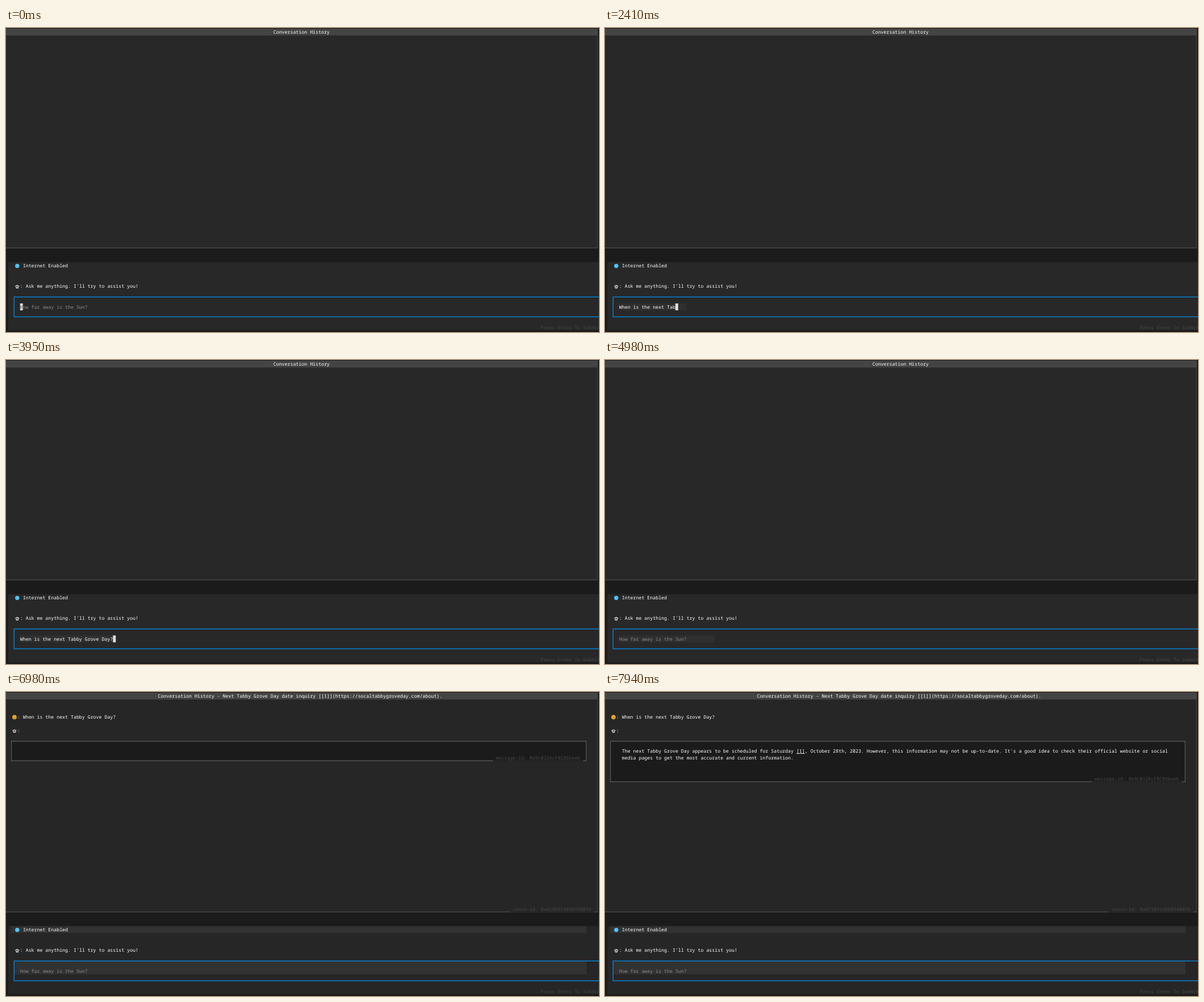
Recreate the animation shown at these times as an HTML page with a canvas. Size 1044 px wide and 536 px high, loop 8000 ms.

```html
<!DOCTYPE html>
<html lang="en">
<head>
<meta charset="utf-8">
<title>Terminal chat</title>
<style>
html, body { margin: 0; width: 100%; height: 100%; overflow: hidden; background: #1b1b1b; }
canvas { display: block; width: 1044px; height: 536px; }
</style>
</head>
<body>
<canvas id="stage" width="1044" height="536"></canvas>
<script>
const ctx = document.getElementById('stage').getContext('2d');
const LOOP = 8000;
const CELL_W = 4.955, CELL_H = 12.116;
const FONT = '8.26px "Noto Sans Mono", "DejaVu Sans Mono", monospace';

const EVENT = 'Tabby Grove Day';
const QUESTION = `When is the next ${EVENT}?`;
const HINT = 'How far away is the Sun?';
const SITE = 'https://socaltabbygroveday.com/about';
const LEAD = `The next ${EVENT} appears to be scheduled for Saturday `;
const ANSWER = [
  LEAD + "[1], October 28th, 2023. However, this information may not be up-to-date. It's a good idea to check their official website or social",
  'media pages to get the most accurate and current information.'
];

// Typing bursts: start, end, first and last character count.
const BURSTS = [
  [330, 330, 1, 1], [480, 750, 2, 5], [900, 1020, 6, 8], [1170, 1170, 10, 10],
  [1540, 1540, 11, 11], [1600, 1870, 12, 15], [2050, 2050, 17, 17],
  [2230, 2410, 18, 20], [2560, 2710, 21, 23], [2920, 3520, 24, 31],
  [3670, 3670, 32, 32], [3950, 3950, 33, 33]
];
const SUBMIT = 4230, REPLY = 5440, TITLED = 5500, STREAM = 7380;
const BLINKS = [150, 330, 4980, 5440, 5960, 6450, 6980, 7490, 7940];

const colX = col => col * CELL_W;
const rowY = row => 1 + row * CELL_H;

function fill(color, x0, y0, x1, y1) {
  ctx.fillStyle = color;
  ctx.fillRect(x0, y0, x1 - x0, y1 - y0);
}

function text(str, col, row, color = '#ffffff') {
  const baseline = Math.round(rowY(row) + 9.2);
  ctx.fillStyle = color;
  [...str].forEach((ch, i) => {
    if (ch !== ' ') ctx.fillText(ch, colX(col + i), baseline);
  });
}

function underline(col, row, count) {
  const y = Math.round(rowY(row) + 10.2);
  fill('#d8d8d8', colX(col), y, colX(col + count), y + 1);
}

function disc(color, x, y, r) {
  ctx.fillStyle = color;
  ctx.beginPath();
  ctx.arc(x, y, r, 0, Math.PI * 2);
  ctx.fill();
}

function robot(x, y, lamp) {
  fill('#b9c3c6', x - 3.4, y - 2, x + 3.4, y - 0.5);
  ctx.fillStyle = '#c9d0d2';
  ctx.beginPath();
  ctx.roundRect(x - 2.6, y - 2.5, 5.2, 5.6, [1, 1, 2.5, 2.5]);
  ctx.fill();
  fill('#3b4447', x - 1.8, y - 1.2, x + 1.8, y + 0.4);
  fill('#59666a', x - 1, y + 1.2, x + 1, y + 1.9);
  disc(lamp, x, y - 2.7, 0.8);
}

function smiley(x, y) {
  disc('#f4b52e', x, y, 3.8);
  disc('#5c3c12', x - 1.3, y - 0.9, 0.6);
  disc('#5c3c12', x + 1.3, y - 0.9, 0.6);
  ctx.strokeStyle = '#5c3c12';
  ctx.lineWidth = 0.7;
  ctx.beginPath();
  ctx.arc(x, y + 0.3, 1.9, 0.3, Math.PI - 0.3);
  ctx.stroke();
}

function typedCount(t) {
  let count = 0;
  if (t >= SUBMIT) return count;
  for (const [start, end, first, last] of BURSTS) {
    if (t < start) break;
    const p = end > start ? Math.min(1, (t - start) / (end - start)) : 1;
    count = first + Math.floor(p * (last - first) + 1e-6);
  }
  return count;
}

const cursorOn = t => BLINKS.filter(b => t >= b).length % 2 === 0;

function answerLines(t) {
  if (t < STREAM) return [];
  if (t < 7440) return [LEAD + '[[1]](' + SITE.slice(0, 12)];
  if (t < 7490) return [ANSWER[0].slice(0, 112)];
  if (t < 7530) return [ANSWER[0], ANSWER[1].slice(0, 11)];
  return ANSWER;
}

function drawHistory(t, panel) {
  fill(panel, 0, 13, 1042, 388);
  fill('#444444', 0, 1, 1042, 13.2);
  fill('#3c3c3c', 1040.5, 13, 1042, 388);
  fill('#444444', 0, 386.8, 1042, 388.5);
  if (t < TITLED) {
    text('Conversation History', 95, 0);
  } else {
    text(`Conversation History - Next ${EVENT} date inquiry [[1]](${SITE}).`, 54, 0);
    fill(panel, 887, 386, 1036, 388.5);
    text('convo-id: 0xd19891488Bf400f8', 180, 31, '#474747');
  }
  if (t >= REPLY) drawMessages(t);
}

function drawMessages(t) {
  smiley(14.9, 44.4);
  text(': ' + QUESTION, 4, 3);
  robot(14.9, 69, '#d8685e');
  text(':', 4, 5);

  const lines = answerLines(t);
  const endRow = lines.length ? 11 + lines.length : 10;
  const top = Math.round(rowY(7)), bottom = Math.round(rowY(endRow));
  fill('#555555', 9, top, 1022, bottom);
  fill('#1b1b1b', 10.3, top + 1.5, 1020.7, bottom - 1.5);
  fill('#1f1f1f', 857, bottom - 1.5, 1016, bottom);
  text('message-id: 0x9c012AcF8C86baeb', 174, endRow - 1, '#474747');

  lines.forEach((line, i) => text(line, 6, 8 + i));
  if (lines.length) {
    const raw = t < 7440;
    underline(6 + LEAD.length + (raw ? 6 : 0), 8, raw ? 12 : 3);
  }
}

function drawPrompt(t, panel) {
  fill(panel, 4, 412.8, 1044, 533);
  if (t >= REPLY) fill('#323232', 9, 412.8, 1022, 425);
  disc('#4fc3f7', 19.8, 419.5, 3.7);
  text('Internet Enabled', 6, 34);
  robot(19.8, 456.3, '#c9d0d2');
  text(": Ask me anything. I'll try to assist you!", 5, 37);
  text('Press Enter To Submit', 190, 43, '#474747');

  fill('#0780d0', 13.5, 473.5, 1044, 510);
  fill(panel, 15, 475, 1044, 508.5);
  const top = rowY(40), bottom = rowY(41);
  const count = typedCount(t);
  if (t >= REPLY) fill('#323232', 15, 475, 1022, bottom);
  else if (t >= 330) fill('#2f2f2f', 24.5, top, t >= 3950 ? 193 : Math.max(143.5, colX(6 + count)), bottom);

  if (count) text(QUESTION.slice(0, count), 5, 40);
  else text(HINT, 5, 40, '#8c8c8c');
  if (cursorOn(t)) {
    fill('#e0e0e0', colX(5 + count), top, colX(6 + count), bottom);
    if (!count) text(HINT[0], 5, 40, '#555555');
  }
}

function draw(t) {
  const panel = t < REPLY ? '#282828' : '#262626';
  ctx.font = FONT;
  ctx.textBaseline = 'alphabetic';
  ctx.textRendering = 'geometricPrecision';
  fill('#1b1b1b', 0, 0, 1044, 536);
  drawHistory(t, panel);
  drawPrompt(t, panel);
}

let start = null;
function tick(now) {
  if (start === null) start = now;
  draw((now - start) % LOOP);
  requestAnimationFrame(tick);
}
requestAnimationFrame(tick);
</script>
</body>
</html>
```
